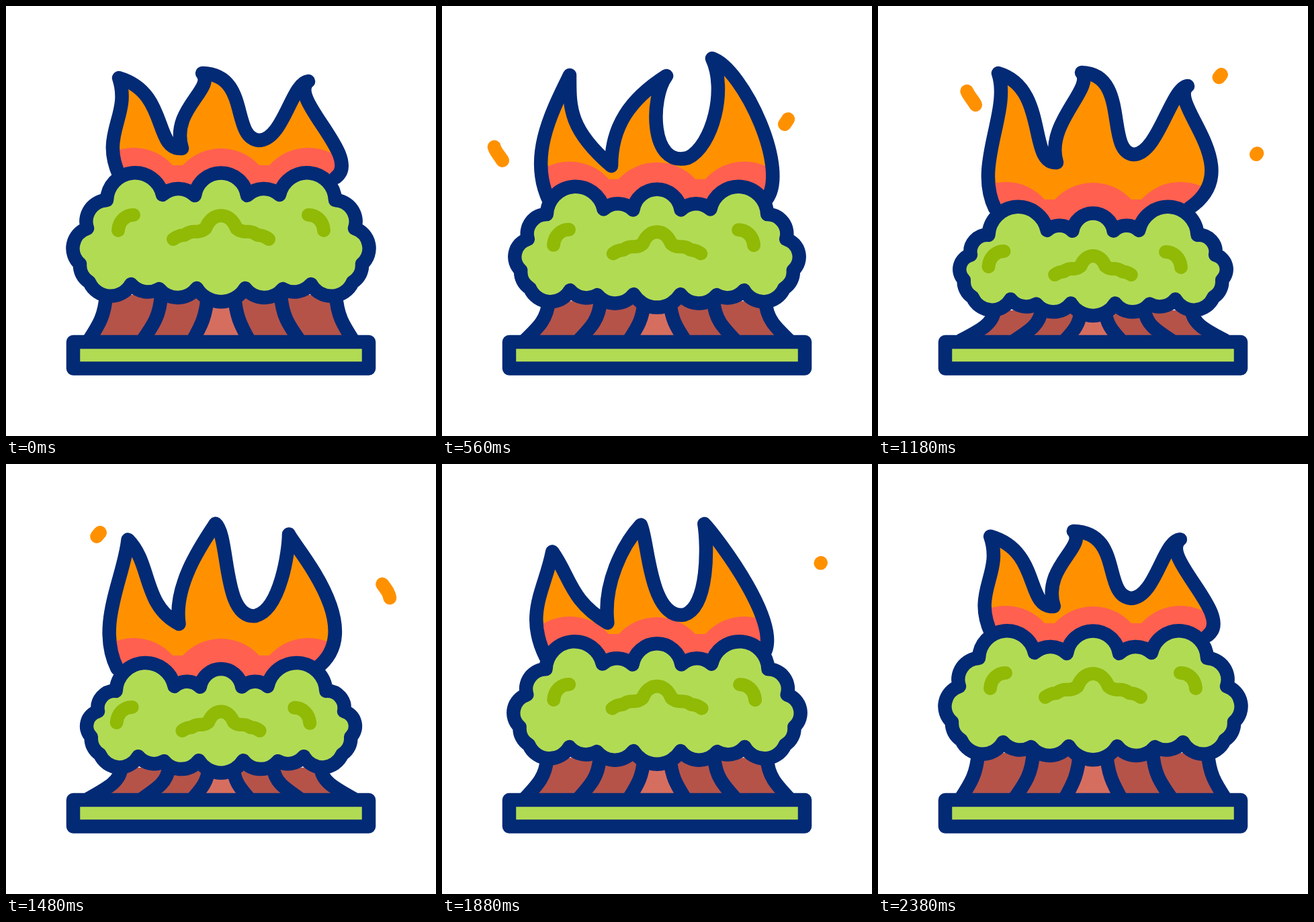
Write an HTML page that moves like this. It is 640x640 px and loops after 2.4 s.

```html
<!DOCTYPE html>
<html lang="en">
<head>
<meta charset="utf-8">
<title>Burning trees</title>
<style>
html, body { margin: 0; width: 100%; height: 100%; overflow: hidden; background: #fff; }
svg { display: block; width: 100vw; height: 100vh; }
path, rect { stroke-width: 20; stroke-linecap: round; stroke-linejoin: round; }
.line { stroke: #032a75; stroke-width: 20.5; }
.open { fill: none; }
.leaf { fill: #b2db54; }
.mark { fill: none; stroke: #90ba06; }
.spark { fill: none; stroke: #ff9100; }
</style>
</head>
<body>
<svg viewBox="0 0 640 640">
  <clipPath id="clip"><path id="clipShape"/></clipPath>
  <path id="trunks" fill="#b55349"/>
  <path id="middle" fill="#d66e5f"/>
  <path id="bark" class="line open"/>
  <path id="fire" fill="#ff9100"/>
  <path id="glow" fill="#ff6050" clip-path="url(#clip)"/>
  <path id="fireEdge" class="line open"/>
  <path id="crown" class="line leaf"/>
  <path id="shadeLeft" class="mark" d="M167 334C168 320 178 311 190 311"/>
  <path id="shadeRight" class="mark" d="M473 334C472 320 462 311 450 311"/>
  <path id="shadeMid" class="mark" d="M-71 35Q-63 29 -54 29Q-47 23 -37 24Q-29 24 -23 19C-18 6 -9 0 0 0
    C9 0 18 6 23 19Q29 24 37 24Q47 23 54 29Q63 29 71 35"/>
  <rect class="line leaf" x="100" y="500" width="440" height="39.5"/>
  <g id="sparks"></g>
</svg>
<script>
const LOOP = 2400;
const $ = id => document.getElementById(id);
const set = (id, d) => $(id).setAttribute('d', d);
const place = (id, x, y, k = 1) => $(id).setAttribute('transform', `translate(${x} ${y}) scale(${k})`);
const lerp = (a, b, s) => a + (b - a) * s;
const clamp = v => Math.max(0, Math.min(1, v));

// cubic-bezier(2/3, 0, 1/3, 1)
function ease(x) {
  let lo = 0, hi = 1;
  for (let i = 0; i < 24; i++) {
    const u = (lo + hi) / 2;
    if (2 * u * (1 - u) ** 2 + u * u < x) lo = u; else hi = u;
  }
  return 3 * lo * lo - 2 * lo ** 3;
}

// Left notches of the crown from top to bottom: x, y, bulge of the leaf arc before each
const NOTCHES = [
  [281, 282, 0.43], [233, 281, 0.2], [150, 289, 0.44], [121, 331, 0.25], [110, 384, 0.29],
  [124, 411, 0.14], [186, 414, 0.31], [228, 421, 0.18], [284, 420, 0.24]
];
const BOTTOM_BULGE = 0.28;

// Squashing lowers the top more than the bottom and pulls the sides in
function squash([x, y, bulge], s) {
  const drop = 38 + 15.5 * Math.cos(Math.PI * clamp((y - 270) / 130));
  const width = y < 285 ? 0.785 : 0.915;
  return [320 + (x - 320) * lerp(1, width, s), y + drop * s, bulge];
}

function crownPath(s) {
  const left = NOTCHES.map(p => squash(p, s));
  const right = left.map(([x, y], i) => [640 - x, y, i + 1 < left.length ? left[i + 1][2] : BOTTOM_BULGE]);
  const ring = [...left, ...right.reverse()];
  let [px, py] = ring[ring.length - 1], d = `M${px} ${py}`;
  for (const [x, y, k] of ring) {
    const r = Math.hypot(x - px, y - py) * (1 / (8 * k) + k / 2);
    d += `A${r} ${r} 0 0 0 ${x} ${y}`;
    [px, py] = [x, y];
  }
  return d + 'Z';
}

// Left trunk lines: top x when tall, top x when squashed, foot x; the right ones are mirrored
const BARK = [[149, 173, 123], [231, 243, 203], [300, 302, 278]];
function barkLine([tall, low, foot], s) {
  const x = lerp(tall, low, s), y = 430 + 23 * s, h = 498 - y;
  return [[x, y], [x - 2, y + 0.45 * h], [lerp(foot, x, 0.6), 498 - 0.35 * h], [foot, 498]];
}
const mirror = line => line.map(([x, y]) => [640 - x, y]);
const cubic = ([a, b, c, d]) => `${a}C${b} ${c} ${d}`;
const between = line => `M${cubic(line)}L${cubic(mirror(line).reverse())}Z`;

// Flame poses: time, left valley, three tips, bend of the tongues
const POSES = [
  [0, 262, 212, 168, 107, 292, 100, 450, 112, 1],
  [560, 252, 238, 190, 103, 334, 104, 402, 78, 0],
  [880, 252, 241, 167, 116, 301, 105, 407, 85, 0.4],
  [1180, 266, 233, 179, 100, 303, 99, 461, 119, 1],
  [1720, 249, 241, 178, 125, 313, 84, 387, 90, 0.1],
  [2040, 247, 229, 152, 131, 279, 99, 406, 93, 0.75]
];

// Smooth periodic interpolation through the poses
function flameAt(t) {
  const n = POSES.length;
  const pose = i => POSES[(i + n) % n];
  const time = i => pose(i)[0] + LOOP * Math.floor(i / n);
  let k = n - 1;
  while (time(k) > t) k--;
  const span = time(k + 1) - time(k), u = (t - time(k)) / span;
  const slope = (i, j) => (pose(i + 1)[j] - pose(i - 1)[j]) / (time(i + 1) - time(i - 1));
  return pose(k).map((a, j) => lerp(a, pose(k + 1)[j], u * u * (3 - 2 * u))
    + span * u * (1 - u) * ((1 - u) * slope(k, j) - u * slope(k + 1, j)));
}

function flamePaths(t, s) {
  const [, vx, vy, x1, y1, x2, y2, x3, y3, b] = flameAt(t);
  const tuck = s ** 4;
  const v1 = [vx, vy], v2 = [vx + 114, vy - 12];
  const baseL = [vx - 92, vy + 43 + 25 * s];
  const baseR = [v2[0] + 115 - 32 * tuck, v2[1] + 55 + 25 * s];
  const tip1 = [x1, y1], tip2 = [x2, y2], tip3 = [x3, y3];

  // Handles are given relative to the ends of each edge
  const edge = (p, q, [ax, ay], [bx, by]) =>
    `C${p[0] + ax} ${p[1] + ay} ${q[0] + bx} ${q[1] + by} ${q}`;
  const line = `M${baseL}`
    + edge(baseL, tip1, [-32, -65], [47 * b - 28, 57])
    + edge(tip1, v1, [75 * b, 47 - 25 * b], [21 * b - 64, 58 * b - 55])
    + edge(v1, tip2, [-18 * b, -58], [75 * b - 55, 35 - 12 * b])
    + edge(tip2, v2, [96 * b - 24, 32 - 30 * b], [15 * b - 57, 15 - 20 * b])
    + edge(v2, tip3, [37, 18 * b - 18], [22 - 47 * b, 46 - 44 * b])
    + edge(tip3, baseR, [46 - 78 * b, 15 + 10 * b], [40 + 50 * tuck, -30 - 30 * s]);
  const body = `${line}L${baseR[0] - 15} ${baseR[1] + 60}L${baseL[0] + 15} ${baseL[1] + 60}Z`;
  return { line, body };
}

function glowPath(s) {
  const y = 237 + 51 * s, hump = x => `A77.5 77.5 0 0 1 ${x} ${y}`;
  return `M132 ${y}${hump(248)}H263${hump(377)}H392${hump(508)}V400H132Z`;
}

// Sparks share one rising squiggle: birth time and offset
const SPARKS = [[180, -425, 85], [500, 0, 0], [815, -371, 0], [1168, 53, 45]];
const sparks = SPARKS.map(([birth, x, y]) => {
  const el = document.createElementNS('http://www.w3.org/2000/svg', 'path');
  el.setAttribute('class', 'spark');
  el.setAttribute('d', 'M510 176C519 164 521 156 515 145C509 135 502 130 502 119C502 112 507 107 511 102');
  el.setAttribute('transform', `translate(${x} ${y})`);
  $('sparks').append(el);
  return { el, birth, length: el.getTotalLength() };
});

function drawSpark({ el, birth, length }, t) {
  const age = t - birth;
  const head = clamp(age / 550), tail = clamp((age - 150) / 570);
  el.style.display = age > 0 && tail < 1 ? '' : 'none';
  el.style.strokeDasharray = `${Math.max(0.01, (head - tail) * length)} ${length * 3}`;
  el.style.strokeDashoffset = -tail * length;
}

function draw(t) {
  const s = ease(1 - Math.abs(2 * t / LOOP - 1));
  const lines = BARK.map(row => barkLine(row, s));
  set('trunks', between(lines[0]));
  set('middle', between(lines[2]));
  set('bark', lines.map(l => `M${cubic(l)}M${cubic(mirror(l))}`).join(''));

  const { line, body } = flamePaths(t, s);
  set('fire', body);
  set('clipShape', body);
  set('fireEdge', line);
  set('glow', glowPath(s));
  set('crown', crownPath(s));

  const k = 1 - 0.2 * s;
  place('shadeLeft', -2.5 * s, 54 * s);
  place('shadeRight', -22 * s, 55 * s);
  place('shadeMid', 320, 312 + 60 * s, k);
  $('shadeMid').style.strokeWidth = 20 / k;
  sparks.forEach(p => drawSpark(p, t));
}

const start = performance.now();
function tick() {
  draw((performance.now() - start) % LOOP);
  requestAnimationFrame(tick);
}
tick();
</script>
</body>
</html>
```
